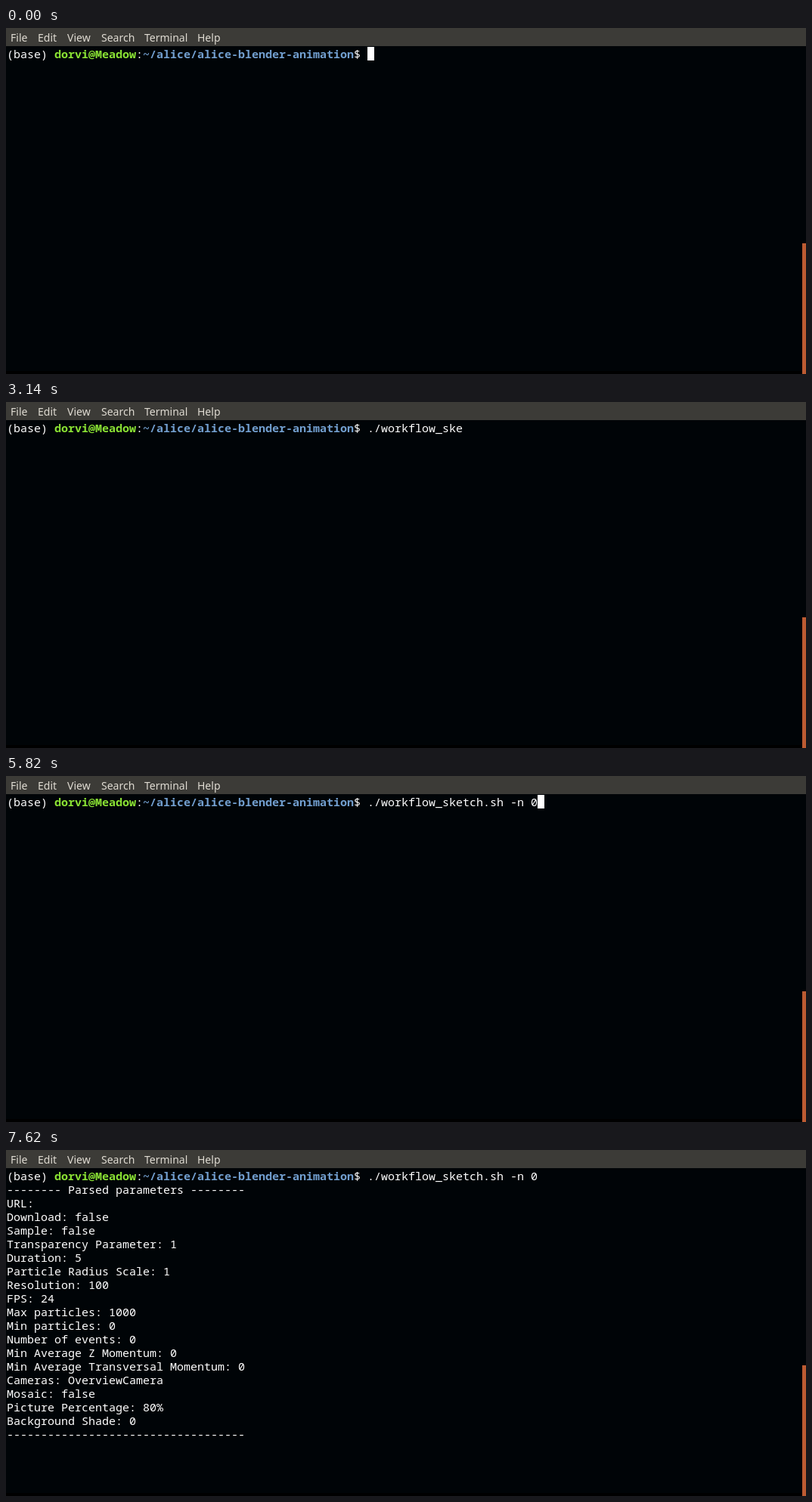
Animation of 1058x458 px, one loop 8000 ms. Source, as an HTML page:

```html
<!DOCTYPE html>
<html lang="en">
<head>
<meta charset="utf-8">
<title>Terminal session</title>
<style>
  html, body { margin: 0; width: 100%; height: 100%; overflow: hidden; background: #000407; }
  svg { display: block; width: 1058px; height: 458px; }
  text { white-space: pre; }
  #menu { font: 14px "Noto Sans", "Open Sans", sans-serif; fill: #dfdbd2; }
  #screen { font: 15px "Noto Sans Mono", "DejaVu Sans Mono", monospace; fill: #fff; font-variant-ligatures: none; }
  .user { fill: #8ae234; font-weight: bold; }
  .path { fill: #729fcf; font-weight: bold; }
</style>
</head>
<body>
<svg viewBox="0 0 1058 458">
  <rect width="1058" height="458" fill="#000407"/>
  <rect y="454" width="1058" height="4" fill="#000"/>
  <rect width="1058" height="24" fill="#3c3b37"/>
  <rect x="1053" y="285" width="5" height="173" fill="#bd5b32"/>
  <g id="menu"></g>
  <g id="screen">
    <text x="1" y="40">(base) <tspan class="user">dorvi@Meadow</tspan>:<tspan class="path">~/alice/alice-blender-animation</tspan>$ <tspan id="typed"></tspan></text>
    <rect id="cursor" y="25" width="9" height="18"/>
  </g>
</svg>
<script>
const LOOP = 8000, CELL = 9, ROW = 18, PROMPT_END = 478;
const COMMAND = "./workflow_sketch.sh -n 0";
const OUTPUT = `-------- Parsed parameters --------
URL:
Download: false
Sample: false
Transparency Parameter: 1
Duration: 5
Particle Radius Scale: 1
Resolution: 100
FPS: 24
Max particles: 1000
Min particles: 0
Number of events: 0
Min Average Z Momentum: 0
Min Average Transversal Momentum: 0
Cameras: OverviewCamera
Mosaic: false
Picture Percentage: 80%
Background Shade: 0
-----------------------------------`.split("\n");

// Time at which each character of the command appears
const KEYS = [680, 720, 990, 1130, 1270, 1380, 1520, 1630, 1800, 1850, 2490, 2890, 3010,
  3140, 3310, 3530, 3600, 4080, 4260, 4350, 4790, 4980, 5260, 5680, 5820];
const CURSOR_OFF = [[1630, 3530], [7260, LOOP]];
// [time, output lines visible]
const PRINTS = [[7280, 5], [7430, 13], [7620, 19]];

const $ = id => document.getElementById(id);

function addText(parent, x, y, content) {
  const el = document.createElementNS("http://www.w3.org/2000/svg", "text");
  el.setAttribute("x", x);
  el.setAttribute("y", y);
  el.textContent = content;
  return parent.appendChild(el);
}

Object.entries({ File: 6, Edit: 42, View: 81, Search: 126, Terminal: 183, Help: 253 })
  .forEach(([label, x]) => addText($("menu"), x, 18, label));

const lines = OUTPUT.map((line, i) => addText($("screen"), 1, 40 + ROW * (i + 1), line));
const typed = $("typed"), cursor = $("cursor");
const show = (el, on) => el.setAttribute("visibility", on ? "visible" : "hidden");

function render(t) {
  const count = KEYS.filter(k => k <= t).length;
  const printed = PRINTS.reduce((n, [at, total]) => t >= at ? total : n, 0);
  typed.textContent = COMMAND.slice(0, count);
  cursor.setAttribute("x", PROMPT_END + CELL * count);
  show(cursor, !CURSOR_OFF.some(([from, to]) => t >= from && t < to));
  lines.forEach((el, i) => show(el, i < printed));
}

const start = performance.now();
function tick() {
  render((performance.now() - start) % LOOP);
  requestAnimationFrame(tick);
}
tick();
</script>
</body>
</html>
```
